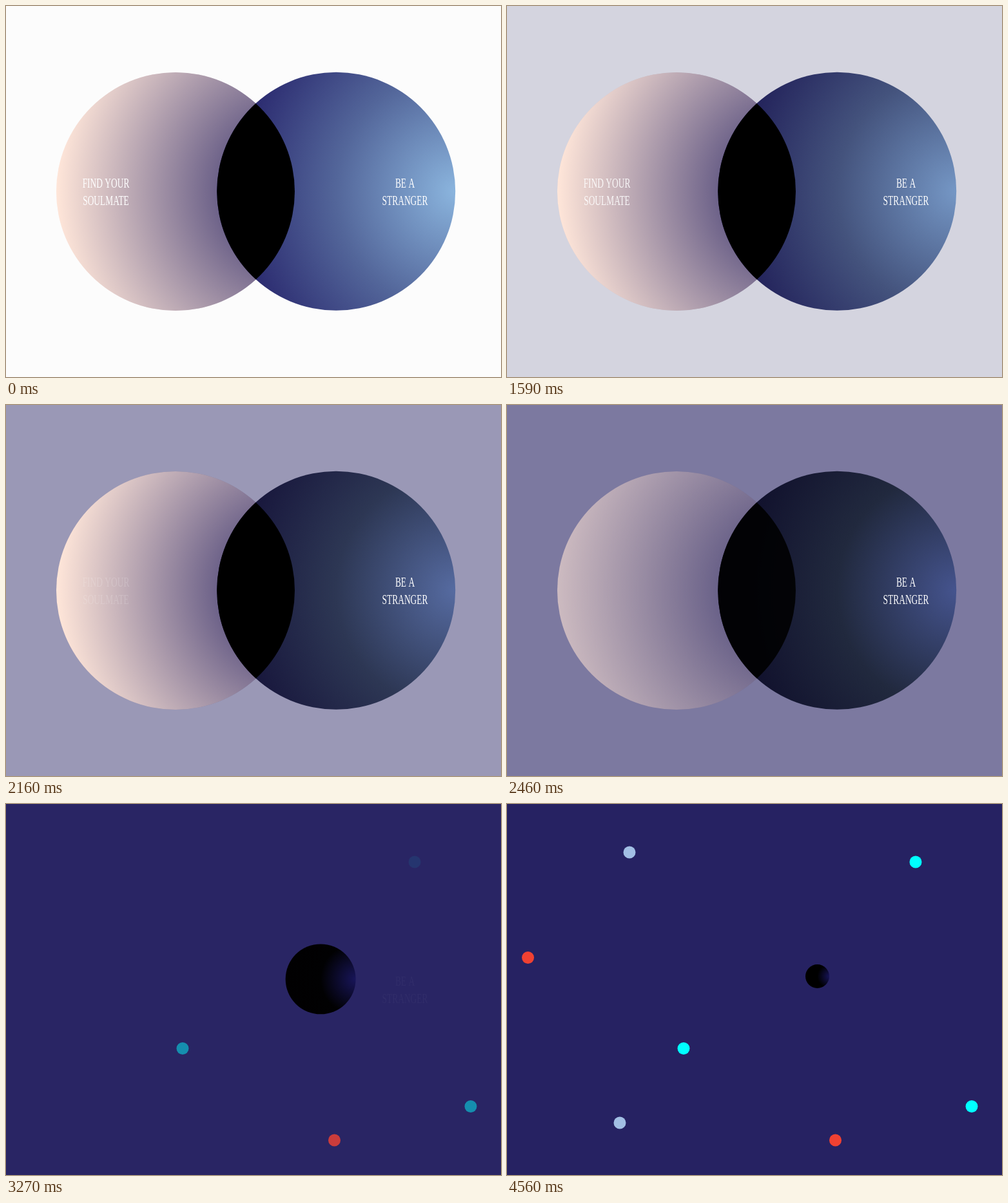
Animation of 768 by 576 pixels, one loop 8100 ms. Source, as an HTML page with a canvas:

```html
<!DOCTYPE html>
<html lang="en">
<head>
<meta charset="utf-8">
<title>Two circles</title>
<style>
  html, body { margin: 0; width: 100%; height: 100%; overflow: hidden; background: #fcfcfc; }
  canvas { display: block; width: 768px; height: 576px; }
</style>
</head>
<body>
<canvas id="stage" width="768" height="576"></canvas>
<script>
const ctx = document.getElementById('stage').getContext('2d');
const LOOP = 8100, STEP = 30;
const PAPER = [252, 252, 252], NIGHT = [38, 34, 98], BLACK = [0, 0, 0];
const PEACH = [255, 230, 217];
const LEFT = { x: 263, y: 288, r: 185 };

// Right circle by day and by night: lit edge, middle, far edge.
const DAY = [[139, 181, 222], [83, 102, 154], [36, 32, 104]];
const DARK = [[22, 19, 88], BLACK, BLACK];

const RED = '#f04132', CYAN = '#00ffff', PALE = '#a2bfe4';
const DOTS = [
  { x: 509.5, y: 522, color: RED, start: 2550 },
  { x: 274, y: 379.5, color: CYAN, start: 2840 },
  { x: 721, y: 469.5, color: CYAN, start: 2840 },
  { x: 634, y: 90, color: CYAN, start: 3205 },
  { x: 32.5, y: 238.5, color: RED, start: 3450 },
  { x: 190, y: 75, color: PALE, start: 3670 },
  { x: 175, y: 495, color: PALE, start: 3670 }
];

const span = (t, from, to) => Math.min(1, Math.max(0, (t - from) / (to - from)));
const lerp = (a, b, k) => a + (b - a) * k;
const mix = (a, b, k) => a.map((v, i) => lerp(v, b[i], k));
const rgb = c => `rgb(${c.map(Math.round).join(',')})`;
const smooth = k => k * k * (3 - 2 * k);

function disc({ x, y, r }, fill, alpha = 1, blend = 'source-over') {
  ctx.globalAlpha = alpha;
  ctx.globalCompositeOperation = blend;
  ctx.fillStyle = fill;
  ctx.beginPath();
  ctx.arc(x, y, r, 0, Math.PI * 2);
  ctx.fill();
  ctx.globalCompositeOperation = 'source-over';
}

// Evenly spaced radial shading that spreads from the circle's right edge.
function shade({ x, y, r }, colors) {
  const g = ctx.createRadialGradient(x + r, y, 0, x + r, y, r * 2);
  colors.forEach((c, i) => g.addColorStop(i / (colors.length - 1), rgb(c)));
  return g;
}

function label(lines, x, alpha) {
  ctx.save();
  ctx.globalAlpha = alpha;
  ctx.fillStyle = '#fff';
  ctx.font = '22px "Liberation Serif", "Times New Roman", serif';
  ctx.textAlign = 'center';
  ctx.translate(x, 282);
  ctx.scale(0.61, 1); // condensed face
  lines.forEach((line, i) => ctx.fillText(line, 0, i * 27));
  ctx.restore();
}

function draw(t) {
  const dusk = span(t, 1200, 3300);
  const glow = 1 - span(t, 2160, 2940);
  const shrink = smooth(span(t, 2640, 3540));

  ctx.globalAlpha = 1;
  ctx.fillStyle = rgb(mix(PAPER, NIGHT, dusk));
  ctx.fillRect(0, 0, 768, 576);

  const peach = shade(LEFT, [NIGHT, PEACH]);
  disc(LEFT, peach, 0.4 * Math.sqrt(glow), 'multiply');
  disc(LEFT, peach, glow);

  const right = {
    x: lerp(512.2, 481.5, shrink),
    y: lerp(287.8, 267.5, shrink),
    r: lerp(185, 18.5, shrink)
  };
  disc(right, shade(right, DAY.map((c, i) => mix(c, DARK[i], dusk))));

  // The overlap stays black until the left circle has gone.
  ctx.save();
  ctx.beginPath();
  ctx.arc(LEFT.x, LEFT.y, LEFT.r, 0, Math.PI * 2);
  ctx.clip();
  disc(right, '#000', Math.pow(glow, 0.25));
  ctx.restore();

  label(['FIND YOUR', 'SOULMATE'], 155, 1 - span(t, 1500, 2300));
  label(['BE A', 'STRANGER'], 619, 1 - span(t, 2520, 3300));

  for (const { x, y, color, start } of DOTS) {
    disc({ x, y, r: 9.5 }, color, span(t, start, start + 890));
  }
}

const begin = performance.now();
function tick() {
  const t = (performance.now() - begin) % LOOP;
  draw(Math.floor(t / STEP) * STEP);
  requestAnimationFrame(tick);
}
tick();
</script>
</body>
</html>
```
